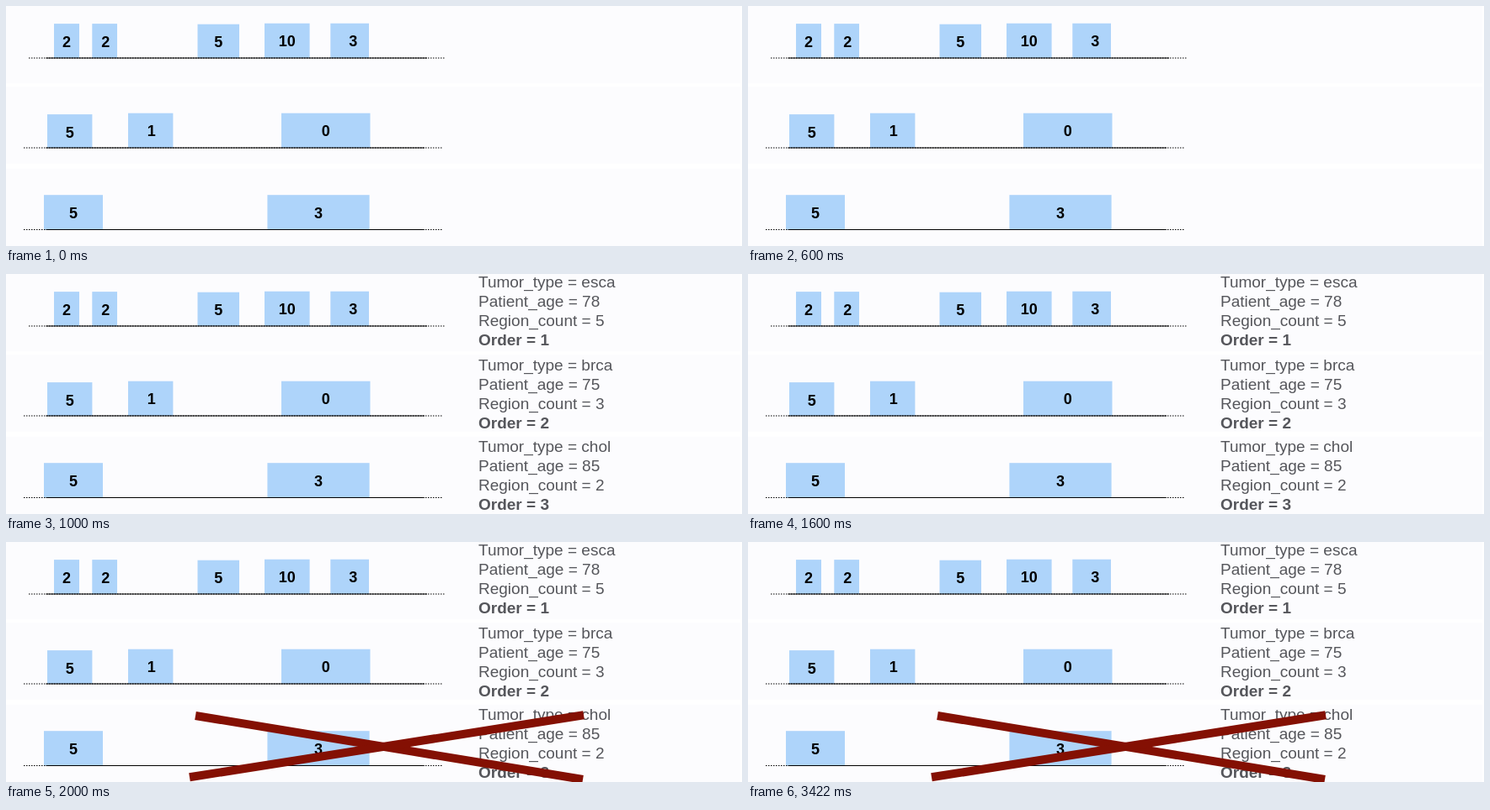
An HTML page for the animation above (4.37 s loop, 874 by 286 pixels).

```html
<!DOCTYPE html>
<html lang="en">
<head>
<meta charset="utf-8">
<title>Region ordering</title>
<style>
  html, body { margin: 0; width: 100%; height: 100%; overflow: hidden; background: #fff; }
  svg { display: block; font-family: "Liberation Sans", Helvetica, Arial, sans-serif; }
  .value { font-size: 18px; font-weight: bold; text-anchor: middle; fill: #000; }
  .info { font-size: 19px; fill: #55565b; }
  .info text:last-child { font-weight: bold; }
</style>
</head>
<body>
<svg id="stage" width="874" height="286" viewBox="0 0 874 286"></svg>
<script>
const NS = "http://www.w3.org/2000/svg";
const LOOP = 4370, INFO_AT = 1000, CROSS_AT = 2000;
const BAR_H = 41.3, LINE_H = 23, AXIS_X = 47.5, AXIS_INSET = 21;
const stage = document.getElementById("stage");

function add(parent, tag, attrs, text) {
  const el = document.createElementNS(NS, tag);
  for (const key in attrs) el.setAttribute(key, attrs[key]);
  if (text !== undefined) el.textContent = text;
  parent.appendChild(el);
  return el;
}

// bar: [left, width, label, drop, label shift]
const rows = [
  { top: 0, axis: 62, from: 27, to: 521, base: 16, type: "esca", age: 78,
    bars: [[57, 30, 2, .4], [102.3, 29.7, 2, .4, 1], [227.5, 49.5, 5, 1], [307, 53.6, 10], [385.3, 45.7, 3, 0, 4]] },
  { top: 96, axis: 169, from: 21, to: 518, base: 115, type: "brca", age: 75,
    bars: [[49, 53.4, 5, 1.4], [145, 53.4, 1, 0, 1], [327, 105.5, 0]] },
  { top: 194, axis: 266.5, from: 21, to: 518, base: 212, type: "chol", age: 85,
    bars: [[45, 70, 5], [310.4, 121.2, 3]] }
];

const main = add(stage, "g", {});
const notes = add(stage, "g", {});
const cross = add(stage, "g", { stroke: "#841003", "stroke-width": 10 });

function drawBar(axis, [x, width, label, drop = 0, shift = 0]) {
  const y = axis - BAR_H + drop;
  add(main, "rect", { x, y, width, height: axis - y, fill: "#aed4fa" });
  add(main, "text", { x: x + width / 2 + shift, y: Math.round(y + 27.5), class: "value" }, label);
}

function drawAxis(y, x1, x2, dash) {
  add(main, "line", { x1, x2, y1: y, y2: y, stroke: "#000", "stroke-dasharray": dash });
}

function drawNotes({ base, type, age, bars }, order) {
  const block = add(notes, "g", { class: "info" });
  const facts = { Tumor_type: type, Patient_age: age, Region_count: bars.length, Order: order };
  Object.entries(facts).forEach(([name, value], i) =>
    add(block, "text", { x: 561, y: base + LINE_H * i }, `${name} = ${value}`));
}

rows.forEach((row, i) => {
  add(main, "rect", { y: row.top, width: 872, height: 92, fill: "#fcfcfe" });
  row.bars.forEach(bar => drawBar(row.axis, bar));
  drawAxis(row.axis, row.from, row.to, "1.5 1.5");
  drawAxis(row.axis, AXIS_X, row.to - AXIS_INSET, "none");
  drawNotes(row, i + 1);
});

add(cross, "line", { x1: 225, y1: 207, x2: 685, y2: 283 });
add(cross, "line", { x1: 218, y1: 280.3, x2: 686, y2: 206.3 });

function render(t) {
  notes.setAttribute("visibility", t >= INFO_AT ? "visible" : "hidden");
  cross.setAttribute("visibility", t >= CROSS_AT ? "visible" : "hidden");
}

const start = performance.now();
function tick() {
  render((performance.now() - start) % LOOP);
  requestAnimationFrame(tick);
}
render(0);
requestAnimationFrame(tick);
</script>
</body>
</html>
```
